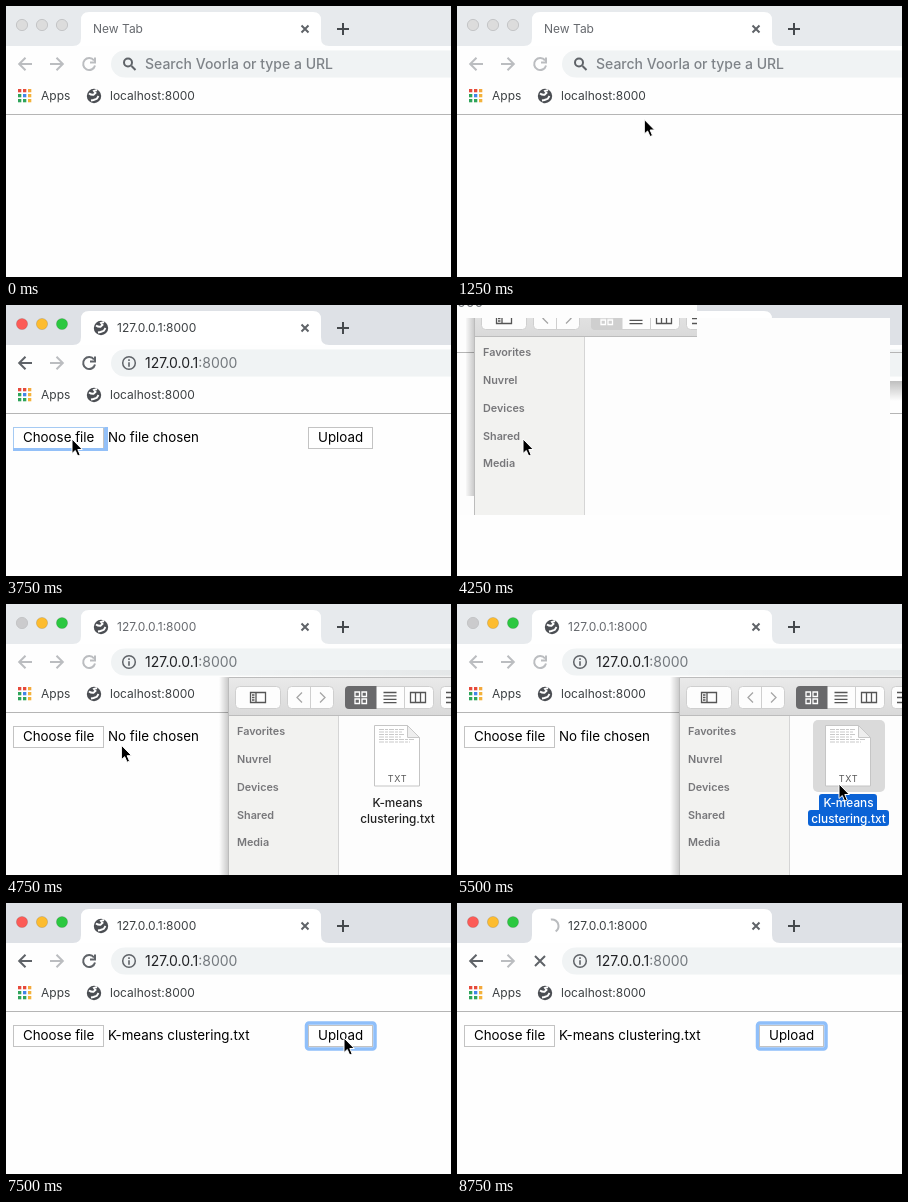
These frames come from a looping animation (445x271 px, 9 s). An HTML page:

```html
<!DOCTYPE html>
<html lang="en">
<head>
<meta charset="utf-8">
<title>File upload demo</title>
<style>
  html, body { margin: 0; width: 100%; height: 100%; overflow: hidden; background: #fefefe; }
  svg { display: block; width: 445px; height: 271px; font: 12px Inter, sans-serif; }
  .line { fill: none; stroke: #5f6368; stroke-width: 2; }
  .dim .line, .line.dim { stroke: #bbbdc0; }
  .page { font-size: 13.33px; fill: #000; }
  .button { fill: #fff; stroke: #c3c3c3; }
  .side { font-size: 10.8px; font-weight: 600; fill: #77777a; }
  .tool { fill: #fdfdfd; stroke: #cfcfcf; }
  .glyph { fill: none; stroke: #555; stroke-width: 1.3; }
  .label { font-size: 11.8px; font-weight: 500; fill: #fff; text-anchor: middle; }
</style>
</head>
<body>
<svg viewBox="0 0 445 271">
  <defs>
    <g id="globe">
      <circle r="7.2" fill="#4b4e53"/>
      <path d="M-5-2.500Q-3-1-.5-1.200L1.500-3 0-5 3-6M-3 4.500L-.5 4 2.800 2.800 4.500 0" fill="none" stroke="#fff" stroke-width="1.900"/>
    </g>
    <linearGradient id="bar" x2="0" y2="1"><stop stop-color="#eaeaea"/><stop offset="1" stop-color="#d9d9d9"/></linearGradient>
    <linearGradient id="edge"><stop stop-color="#000" stop-opacity="0"/><stop offset="1" stop-color="#000" stop-opacity=".2"/></linearGradient>
    <linearGradient id="drop" x2="0" y2="1"><stop stop-color="#000" stop-opacity=".25"/><stop offset="1" stop-color="#000" stop-opacity="0"/></linearGradient>
    <clipPath id="sheet"><path d="M9 13H240V33H433V210H9z"/></clipPath>
  </defs>
  <rect width="445" height="271" fill="#fefefe"/>

  <rect id="strip" width="445" height="40"/>
  <g id="lights"></g>
  <path d="M67 40Q75 40 75 32V14Q75 6 83 6H307Q315 6 315 14V32Q315 40 323 40z" fill="#fff"/>
  <use id="favicon" href="#globe" x="95" y="23"/>
  <circle id="spinner" cx="95" cy="23" r="6.500" pathLength="360" fill="none" stroke="#b9bbbe" stroke-width="2"/>
  <text id="title" y="27"></text>
  <path class="line" d="M295.500 19.500l7 7m0-7l-7 7" stroke-width="1.600"/>
  <path class="line" d="M331 23h12m-6-6v12" style="stroke:#45494d"/>

  <path id="back" class="line" d="M26 58H13.500m6-6.200L13.200 58l6.300 6.200"/>
  <path class="line dim" d="M44 58H56.500m-6-6.200l6.300 6.200-6.300 6.200"/>
  <g id="reload">
    <path class="line" d="M88 54.500A6 6 0 1 0 89 59.500"/>
    <path class="line" d="M89 51.500v5h-5"/>
  </g>
  <path id="stop" class="line" d="M78 53l10 10m0-10L78 63"/>
  <rect x="105" y="44.500" width="380" height="27" rx="13.500" fill="#f0f3f4"/>
  <g id="search">
    <path class="line" d="M125.500 60l4 4" />
    <circle class="line" cx="122" cy="56.500" r="4" stroke-width="1.700"/>
    <text x="139" y="63" font-size="14" font-weight="500" fill="#7e8388">Search Voorla or type a URL</text>
  </g>
  <g id="address">
    <circle class="line" cx="123" cy="58" r="6.300" style="stroke-width:1.500"/>
    <path class="line" d="M123 54.300v1.700m0 1.200v4.500" style="stroke-width:1.600"/>
    <text x="139" y="63" font-size="14" fill="#202124">127.0.0.1<tspan fill="#73787d">:8000</tspan></text>
  </g>
  <g id="apps"></g>
  <g fill="#3c4043">
    <text x="35" y="94">Apps</text>
    <text x="104" y="94">localhost:8000</text>
  </g>
  <use href="#globe" x="88" y="90"/>
  <path d="M0 108.500H445" stroke="#b5b5b5"/>

  <g id="page" class="page">
    <rect class="button" x="7.500" y="122.500" width="90" height="21"/>
    <g id="chooseFocus">
      <path d="M98 122h4v24H7v-3h91z" fill="#93c0f8"/>
      <path d="M7.500 143V122.500H99" fill="none" stroke="#a5caf3"/>
    </g>
    <text x="17" y="137">Choose file</text>
    <text id="fileName" x="102" y="137"></text>
    <rect id="uploadFocus" x="300.500" y="120" width="68.500" height="26" rx="2.500" fill="none" stroke="#8fbffa" stroke-width="3.500"/>
    <rect class="button" x="302.500" y="122.500" width="64" height="21"/>
    <text x="312" y="137">Upload</text>
  </g>

  <g id="opening">
    <path d="M0 0H240V13H433V210H0z" fill="#fdfdfd"/>
    <path d="M0 47.500H17M433 47.500h12" stroke="#b5b5b5"/>
    <rect x="433" y="76" width="12" height="20" fill="url(#drop)"/>
    <text x="-66" y="2" font-size="14" fill="#73787d">127.0.0.1:8000</text>
  </g>

  <g id="dialogClip"><g id="dialog">
    <rect x="213" y="73" width="9" height="198" fill="url(#edge)"/>
    <rect x="222" y="66" width="223" height="7" fill="url(#edge)" opacity=".25"/>
    <rect x="222" y="73" width="440" height="230" fill="#fdfdfd"/>
    <rect x="222" y="112" width="110" height="200" fill="#f2f2f0"/>
    <path d="M332.500 112V310" stroke="#d5d5d5"/>
    <rect x="222" y="73" width="440" height="39" fill="url(#bar)"/>
    <path d="M222.500 310V73.500H662M222 111.500H662" fill="none" stroke="#bcbcbc"/>
    <g class="tool">
      <rect x="229.500" y="82.500" width="45" height="22" rx="4"/>
      <rect x="281.500" y="82.500" width="46" height="22" rx="4"/>
      <rect x="339.500" y="82.500" width="88" height="22" rx="4"/>
      <rect x="434.500" y="82.500" width="50" height="22" rx="4"/>
      <path d="M304.500 83v21M398.500 83v21"/>
    </g>
    <path id="gridButton" d="M370.500 82H343q-4 0-4 4v15q0 4 4 4h27.500z"/>
    <path d="M349 88h4.500v4.500H349zM356 88h4.500v4.500H356zM349 95h4.500v4.500H349zM356 95h4.500v4.500H356z" fill="none" stroke="#fff" stroke-width="1.300"/>
    <path class="glyph" d="M244.500 88.500h15v10h-15zM250 88.500v10M246 91h2.500m-2.500 2.500h2.500m-2.500 2.500h2.500M377.500 88.500h13m-13 3.400h13m-13 3.400h13m-13 3.400h13M404.500 88.500h15v10h-15zm5 0v10m5-10v10M440 88.500h6m-6 5h6m-6 5h6"/>
    <path class="glyph" d="M296 88.500l-5 5 5 5M314 88.500l5 5-5 5" style="stroke:#a6a6a6"/>
    <g class="side">
      <text x="231" y="131">Favorites</text>
      <text x="231" y="159">Nuvrel</text>
      <text x="231" y="187">Devices</text>
      <text x="231" y="215">Shared</text>
      <text x="231" y="242">Media</text>
    </g>
    <g id="file">
      <rect id="fileGlow" x="356" y="116" width="72" height="72" rx="5" fill="#dadada"/>
      <path d="M368.500 121.500h33l12 12v48.500h-45z" fill="#fff" stroke="#c5c5c5"/>
      <path d="M401.500 121.500v12h12z" fill="#eee" stroke="#c8c8c8"/>
      <path d="M373 125.500h25m-25 2.500h23m-23 2.500h26m-26 2.500h22m-22 2.500h35m-35 2.500h31" stroke="#c9c9c9" stroke-dasharray="5 1 3 1"/>
      <text x="391.500" y="177.500" font-size="9" letter-spacing=".7" fill="#555" text-anchor="middle">TXT</text>
      <path id="labelGlow" d="M365 190h52q3 0 3 3v13h9q3 0 3 3v10q0 3-3 3h-75q-3 0-3-3v-10q0-3 3-3h8v-13q0-3 3-3z" fill="#0b63d6"/>
      <g id="fileLabel" class="label">
        <text x="391.500" y="203">K-means</text>
        <text x="391.500" y="218.500">clustering.txt</text>
      </g>
    </g>
  </g></g>

  <path id="cursor" d="M0 0V14.500L3.300 11.500 5.700 17 8.200 16 5.800 10.500H10.300z" fill="#000" stroke="#fff"/>
</svg>

<script>
const LOOP = 9000, STEP = 250;
const $ = id => document.getElementById(id);
const show = (id, on) => { $(id).style.display = on ? '' : 'none'; };
const set = (id, attrs) => {
  for (const key in attrs) $(id).setAttribute(key, attrs[key]);
};

const LIGHTS = ['#fc5b57', '#fdbc2f', '#2bc840'];
$('lights').innerHTML = LIGHTS.map((_, i) =>
  `<circle cx="${16 + 20 * i}" cy="19" r="5.600"/>`).join('');

const APP_COLORS = ['#e64a3b', '#e64a3b', '#f3a83b', '#2fa45a', '#4285e8', '#f3b23b', '#2fa45a', '#2fa45a', '#f3b23b'];
$('apps').innerHTML = APP_COLORS.map((color, i) =>
  `<rect x="${12 + 5 * (i % 3)}" y="${83 + 5 * Math.floor(i / 3)}" width="3.300" height="3.300" fill="${color}"/>`).join('');

// Pointer path: time, x, y
const PATH = [
  [500, 405, 181], [1500, 147, 101], [1750, 143, 93], [3000, 143, 93],
  [3500, 66, 134], [4500, 66, 134], [5500, 382, 180], [6000, 382, 180],
  [6250, 361, 173], [6750, 338, 135], [8250, 338, 135]
];

function pointerAt(t) {
  const next = PATH.findIndex(key => key[0] > t);
  if (next < 1) return null;
  const [t0, x0, y0] = PATH[next - 1], [t1, x1, y1] = PATH[next];
  const p = (t - t0) / (t1 - t0), ease = p * p * (3 - 2 * p);
  return [x0 + (x1 - x0) * ease, y0 + (y1 - y0) * ease];
}

function render(t) {
  const within = (from, to) => t >= from && t < to;
  const idle = t < 1750;
  const behind = within(4500, 6500);
  const active = !idle && !behind;
  const visited = t >= 2000;
  const loaded = t >= 2750;
  const firstLoad = within(2000, 2750);
  const uploading = t >= 7750;
  const loading = firstLoad || uploading;

  // Browser chrome
  set('strip', { fill: active ? '#dee1e6' : '#e7eaed' });
  [...$('lights').children].forEach((light, i) => {
    const gray = idle || (behind && i === 0);
    light.setAttribute('fill', gray ? (idle ? '#dcdcdc' : '#cbcbcd') : LIGHTS[i]);
    light.setAttribute('stroke', gray ? '#c4c5c7' : 'rgba(0,0,0,.12)');
  });
  $('title').textContent = t >= 2500 ? '127.0.0.1:8000' : 'New Tab';
  set('title', { x: visited ? 111 : 87, fill: active ? '#3c4043' : '#66696e' });
  show('favicon', loaded && !uploading);
  show('spinner', loading);
  const start = firstLoad ? -135 + (t - 2250) * 0.36 : -100 + (t - 8750) * 0.36;
  set('spinner', {
    'stroke-dasharray': `${firstLoad ? 40 : 155} 360`,
    transform: `rotate(${start} 95 23)`
  });
  set('back', { class: loaded && active ? 'line' : 'line dim' });
  set('reload', { class: active ? '' : 'dim' });
  show('reload', !loading);
  show('stop', loading);
  show('search', !visited);
  show('address', visited);

  // Upload form
  show('page', loaded);
  show('chooseFocus', within(3500, 4500) || within(6000, 7500));
  show('uploadFocus', t >= 7500);
  $('fileName').textContent = t >= 6500 ? 'K-means clustering.txt' : 'No file chosen';

  // File dialog
  const opening = within(4250, 4500), selected = t >= 5500;
  show('opening', opening);
  show('dialog', within(4250, 6000));
  set('dialog', { transform: opening ? 'translate(-205 -80)' : '' });
  set('dialogClip', { 'clip-path': opening ? 'url(#sheet)' : 'none' });
  set('gridButton', { fill: opening ? '#cfcfcf' : '#69696b' });
  show('file', !opening);
  show('fileGlow', selected);
  show('labelGlow', selected);
  $('fileLabel').style.fill = selected ? '#fff' : '#222';

  const pointer = pointerAt(t);
  show('cursor', pointer);
  if (pointer) set('cursor', { transform: `translate(${pointer})` });
}

function tick() {
  const t = performance.now() % LOOP;
  render(Math.floor(t / STEP) * STEP);
  requestAnimationFrame(tick);
}
tick();
</script>
</body>
</html>
```
